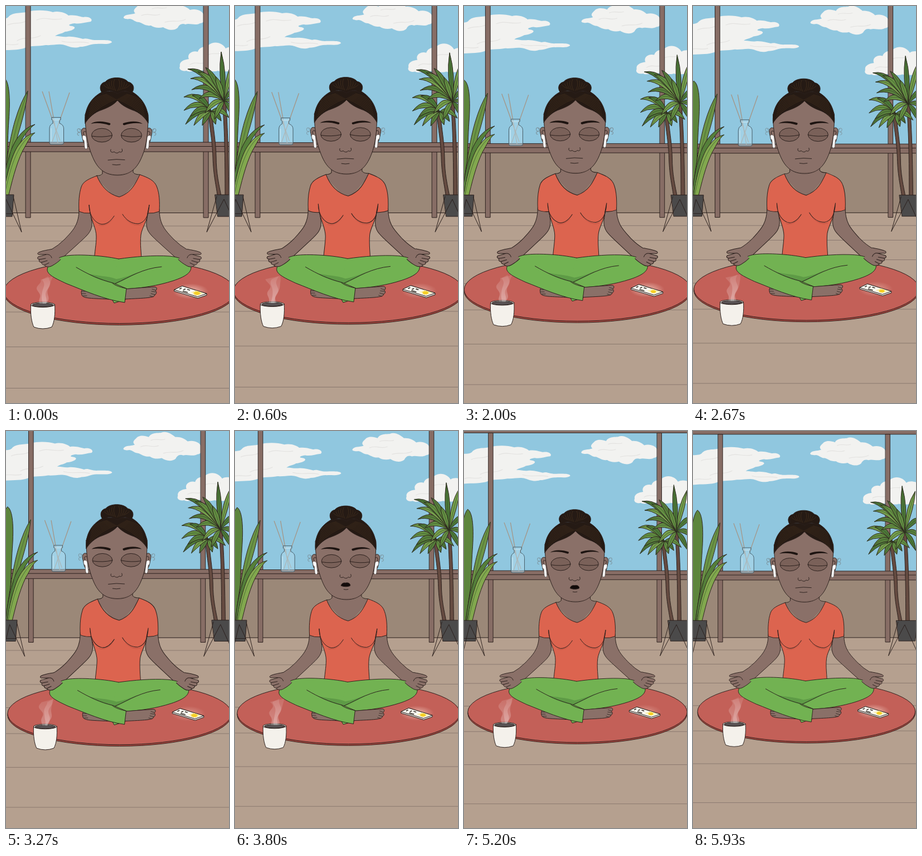
Write an HTML page that moves like this. It is 400 px wide and 711 px high and loops after 6 s.

```html
<!DOCTYPE html>
<html lang="en">
<head>
<meta charset="utf-8">
<title>Breathing break</title>
<style>
html, body { margin: 0; width: 100%; height: 100%; overflow: hidden; background: #b5a08f; }
svg { display: block; width: 400px; height: 711px; }
.o { stroke: #2a1f1c; stroke-width: 1; stroke-linejoin: round; stroke-linecap: round; }
.l { fill: none; }
.skin { fill: #8a7068; }
.shirt { fill: #dc644f; }
.pants { fill: #72b252; }
.wood { fill: #876d65; }
.pot { fill: #4b4a4a; }
.cloud { fill: #f2f2f0; }
.shade { fill: none; stroke: #e3e2e0; stroke-width: 1.2; stroke-linecap: round; }
</style>
</head>
<body>
<svg viewBox="0 0 400 711">
<defs>
  <linearGradient id="fade" x1="0" y1="0" x2="0" y2="1">
    <stop offset="0" stop-color="#fff" stop-opacity=".1"/>
    <stop offset="1" stop-color="#fff" stop-opacity=".26"/>
  </linearGradient>
  <radialGradient id="glow">
    <stop offset=".4" stop-color="#ffe9dc" stop-opacity=".4"/>
    <stop offset="1" stop-color="#ffe9dc" stop-opacity="0"/>
  </radialGradient>
</defs>
<g id="scene">
  <rect x="-20" y="-40" width="440" height="300" fill="#90c7df"/>

  <path class="cloud" d="M-25 24C-8 23 0 24 4 20C12 10 28 14 40 10C52 7 72 7 84 11C95 8 108 13 112 17C125 15 134 20 139 20C149 18 157 24 152 28C142 29 133 33 123 31C115 32 108 35 119 36C130 39 117 45 106 46C100 50 92 50 88 54C94 53 101 56 110 55C121 54 130 57 138 59C146 56 152 62 164 61C174 61 190 60 190 65C183 70 172 67 163 68C153 67 145 73 133 73C121 77 112 72 105 70C93 67 84 71 71 70C58 73 45 70 34 75C19 81 -6 77 -25 82Z"/>
  <path class="shade" d="M3 34C16 28 25 34 38 26M55 25C72 18 80 27 100 23M20 62C36 53 45 62 62 53M100 63C118 68 126 62 148 66M-10 70C2 66 10 72 22 68"/>
  <g transform="translate(0 2)">
    <path class="cloud" d="M211 18C214 12 224 14 232 11C226 6 232 2 237 -3C244 -7 252 -5 258 -3C263 -12 276 -10 281 -11C290 -15 300 -9 307 -3C316 -4 325 0 330 5C342 2 351 7 354 12C360 20 357 28 348 29C340 34 329 28 322 31C314 28 310 33 308 37C300 44 288 40 282 36C274 38 266 37 260 33C250 34 245 29 239 27C231 27 229 22 222 21C217 22 210 21 211 18Z"/>
    <path class="shade" d="M243 15C255 9 263 18 276 13M285 27C300 22 308 29 322 22M262 3C272 -1 280 4 288 1"/>
  </g>
  <path class="cloud" d="M312 108C310 100 319 96 328 95C324 87 333 79 344 82C348 71 359 74 363 70C375 61 389 67 394 76C403 70 414 76 425 78V120C405 113 395 120 380 116C369 120 356 112 348 117C337 114 330 120 324 116C315 118 309 113 312 108Z"/>
  <path class="shade" d="M330 105C340 98 348 106 358 101M362 88C370 82 378 88 390 84"/>

  <rect x="-20" y="261" width="440" height="111" fill="#9b8878"/>
  <rect x="-20" y="371" width="440" height="400" fill="#b5a08f"/>
  <path class="o l" stroke-width=".8" d="M-20 370.5H420"/>
  <g id="planks" stroke="#84736a" stroke-width=".9"></g>

  <g class="o wood">
    <rect x="-20" y="-40" width="440" height="23.700"/>
    <path d="M35.500 -16.300H44V379H35.500ZM354.500 -16.300H363V379H354.500Z"/>
    <rect x="-20" y="244" width="440" height="17"/>
    <path class="l" d="M-20 251.500H420"/>
  </g>

  <g fill="none" stroke="#a59484" stroke-width="1.300">
    <path d="M65 153L97 241M77 153L93 245M114 155L83 243"/>
  </g>
  <path fill="#b4dced" fill-opacity=".5" stroke="#435964" d="M82 199.500H98V204H96V210C101 212 103.500 215 103.500 220V245Q103.500 248 100 248H81Q78 248 78 245V220C78 215 80 212 84 210V204H82Z"/>
  <path fill="none" stroke="#cfe8f1" d="M81 219V243M83 204H97"/>

  <g id="palm"></g>
  <g id="aloe"></g>

  <ellipse class="o" cx="203.700" cy="513.800" rx="207.500" ry="57.500" fill="#a9473f"/>
  <ellipse class="o" cx="203.700" cy="511" rx="207.500" ry="57.500" fill="#c36058"/>

  <g class="torso">
    <path class="skin" d="M172 270V303L160 306L202 350L243 304L228 300V270Z"/>
    <path class="o l" d="M173 285V300Q171 304 163 304M228 285V298Q231 302 240 302"/>
    <g id="arm"><path class="o skin" d="M131 364C131 392 120 402 105 418Q94 429 80 437L97 455L128 427C145 411 155 405 154 387L151 366"/></g>
    <use href="#arm" transform="matrix(-1 0 0 1 406 0)"/>
    <path class="o shirt" d="M163 304C150 309 138 314 135 324C131 336 130 352 131 368Q140 372 151 371C154 386 162 399 162 413C162 428 159 438 158 460H243C243 440 240 428 242 410C244 396 254 384 254 371Q265 372 275 368C276 350 275 336 271 325C267 312 254 307 240 302C232 319 224 335 203 342C183 337 170 322 163 304Z"/>
    <path class="o l" d="M151 371L149 356C149 376 160 389 172 391C183 391 190 382 194 376M254 371L257 356C256 376 249 388 237 390C225 390 215 383 209 373"/>
    <path fill="none" stroke="#b84c3e" stroke-width="1.500" opacity=".5" d="M166 392C176 396 184 389 190 383M243 391C232 395 222 389 215 382"/>
  </g>

  <g class="o">
    <path class="skin" d="M201 505L138 507C134 510 135 514 136 518C140 525 158 523 198 526"/>
    <path class="l" d="M136 511H142M136 515H143M138 519H145" stroke-width=".8"/>
    <path class="pants" d="M202 453C230 449 265 446 293 448C316 450 330 459 332 468C332 478 321 485 300 492C272 501 245 505 214 507L214 526L194 532L188 522L160 480Z"/>
    <path class="skin" d="M212 507C235 505 252 504 266 503C272 503 271 508 268 510C271 512 270 516 267 517C267 523 250 523 213 525"/>
    <path class="l" d="M262 507L268 509M261 511L268 512M260 515L267 517M258 519L264 521" stroke-width=".8"/>
    <path class="pants" d="M202 453C170 446 122 444 104 448C88 452 74 462 74 473C75 482 91 489 108 497C139 509 176 526 213 531L216 506C201 503 194 499 190 496"/>
    <path fill="#5e9b46" stroke="none" d="M146 479C164 484 182 483 198 489C212 487 226 481 238 476C224 485 212 491 197 498C178 494 160 488 146 479Z"/>
    <path class="l" d="M126 468C148 481 168 490 192 496L216 506M279 467C245 470 223 485 196 497"/>
  </g>

  <g class="torso">
    <g id="hand">
      <path class="o skin" d="M82 435.500C75 437 66 438 59 441C55 443 57 446 61 445L72 445C66 447 61 448 58 449C55 451 57 454 60 454C58 457 61 460 64 459C63 463 68 464 69 464C71 468 78 468 83 465C90 461 94 458 98 454"/>
      <path class="o l" stroke-width=".8" d="M72 445C77 444 81 447 82 451M60 454L71 452M64 459L74 456M69 464L77 460"/>
    </g>
    <use href="#hand" transform="matrix(-1 0 0 1 407 0)"/>
  </g>

  <g id="head">
    <g id="ear">
      <path class="o skin" d="M146 221C138 215 133 221 136 231C138 241 139 250 147 249"/>
      <path class="o l" stroke-width=".8" d="M144 226C139 222 137 227 140 232"/>
      <path d="M137 235C136 230 144 231 144 236L146 253Q146 256 143.500 256Q141.500 256 141 253L140 241Q137 240 137 235Z" fill="#fafafa" stroke="#55504e" stroke-width=".7"/>
    </g>
    <use href="#ear" transform="matrix(-1 0 0 1 397 0)"/>
    <g class="ring" fill="none" stroke="#7b929c" stroke-width="1.100">
      <path d="M135 222C130 217 126 221 129 225C132 228 136 224 132 221M133 227C128 225 126 231 131 232"/>
      <path d="M262 222C267 217 271 221 268 225C265 228 261 224 265 221M264 227C269 225 271 231 266 232"/>
    </g>
    <path class="o skin" d="M142 195C142 226 147 250 154 267C161 285 172 303 200 303C227 303 238 285 245 267C252 250 255 226 255 195C250 160 148 160 142 195Z"/>
    <path fill="#735b53" opacity=".5" d="M170 293C180 303 217 305 230 292C222 300 214 302 200 302C186 302 178 299 170 293Z"/>
    <path class="o" fill="#251a14" d="M142 210C140 186 150 165 174 153H225C247 165 257 187 255 210C250 200 239 190 226 186C213 181 205 175 200 169C195 175 186 181 172 186C159 190 148 200 142 210Z"/>
    <path class="o" fill="#251a14" d="M174 157C166 150 168 138 178 136C186 126 211 126 219 136C230 138 232 150 224 157C216 149 208 153 200 157C190 151 181 150 174 157Z"/>
    <g id="half"></g>
    <use href="#half" transform="matrix(-1 0 0 1 397 0)"/>
    <g id="eye">
      <ellipse class="o" cx="172" cy="231.500" rx="18.500" ry="12.300" fill="#7a6159" stroke-width=".9"/>
      <path class="o l" d="M154 233Q172 236 190 232" stroke-width=".9"/>
      <path class="brow" fill="#1d1411" d="M152 211C160 205 176 206 187 210Q188 213 185 213.500C173 209.500 162 209 152 211Z"/>
    </g>
    <use href="#eye" transform="matrix(-1 0 0 1 397 0)"/>
    <path class="o l" d="M188 257C186 262 191 263 194 261C197 264 201 264 203 261C207 263 210 261 208 256"/>
    <path id="shut" class="o l" d="M183 276Q198 273.500 213 275.500M191 284Q198 285.500 205 284"/>
    <g id="open">
      <path class="o" fill="#120b0a" d="M190 277C190 273 195 271 198 272C202 271 207 272 207 277C204 279.500 193 279.500 190 277Z"/>
      <path class="o l" d="M195 284Q199 285 203 284"/>
    </g>
  </g>

  <ellipse id="halo" cx="331" cy="511" rx="32" ry="14" fill="url(#glow)"/>
  <path class="o" fill="#d8d4d0" d="M302 508L316 501.500L360 515V518L344 523.500L302 511Z"/>
  <path class="o" fill="#fbf8f0" stroke-width=".8" d="M302 508L316 501.500L360 515L344 520.500Z"/>
  <path stroke="#3c3632" stroke-width="1.700" d="M311 507L315 505M318 508.500L322 506.500M325 507.500L330 509M317 510.500L326 513"/>
  <path fill="#fdf1b4" d="M331 513L341 509.500L355 514.500L344 518Z"/>
  <path id="sun" fill="#f6ce25"/>

  <path class="o" fill="#f4f1eb" d="M44.500 535C43.500 552 46 567 50 575Q66 581 82 575C87 566 88.500 551 87.500 535Z"/>
  <ellipse class="o" cx="66" cy="535" rx="21.500" ry="4.500" fill="#dad5ce"/>
  <ellipse class="o" cx="66" cy="535.500" rx="19" ry="3.300" fill="#595354" stroke-width=".7"/>
  <path class="steam" fill="url(#fade)"/>
  <path class="steam" fill="url(#fade)"/>
</g>
</svg>
<script>
const LOOP = 6000, FPS = 15;
const $ = id => document.getElementById(id);
const all = sel => [...document.querySelectorAll(sel)];
const greens = ['#4d7838', '#659043', '#587f3c', '#759e4c'];

// A pointed leaf that arches and droops, with a midrib.
function leaf([x, y], [tx, ty], fill) {
  const lift = Math.abs(tx - x) * .45, w = 9;
  const cx = x + (tx - x) * .5, cy = y + (ty - y) * .5 - lift;
  const len = Math.hypot(tx - x, ty - y);
  const nx = -(ty - y) / len * w, ny = (tx - x) / len * w;
  return `<path class="o" stroke-width=".8" fill="${fill}" d="M${x} ${y}Q${cx + nx} ${cy + ny} ${tx} ${ty}Q${cx - nx} ${cy - ny} ${x} ${y}"/>
    <path fill="none" stroke="#344f28" stroke-width=".7" d="M${x} ${y}Q${cx} ${cy} ${tx} ${ty}"/>`;
}

const crown = (root, tips) => tips.map((tip, i) => leaf(root, tip, greens[i % 4])).join('');

$('planks').innerHTML = [394, 421, 457, 500, 548, 610.5, 684.5]
  .map(y => `<path d="M-20 ${y}H420"/>`).join('');

const stand = '<path class="o l" stroke-width="1.200" d="M13 341L28 405L0 346L-14 404M-14 372H12"/>';
const pot = '<path class="o pot" d="M-20 338H14L11 377H-20Z"/>' + stand;

$('palm').innerHTML = `
  <g class="o" fill="#654b41">
    <path d="M363 190C366 225 370 240 371 270C372 305 377 320 380 345H387C382 320 377 300 377 270C376 240 372 220 369 190Z"/>
    <path d="M388 170C392 215 393 270 393 345H400C399 270 398 220 394 170Z"/>
  </g>
  <path class="o pot" d="M375 338H415L411 377H380Z"/>
  <path class="o l" stroke-width="1.200" d="M378 341L360 405L391 346L418 405"/>`
  + crown([368, 188], [[386, 206], [376, 212], [352, 214], [337, 214], [322, 212],
    [319, 187], [330, 198], [319, 163], [334, 160], [400, 200]])
  + crown([391, 170], [[412, 205], [374, 203], [425, 185], [357, 192], [425, 145], [346, 166],
    [333, 150], [331, 130], [326, 113], [344, 118], [358, 110], [411, 92], [386, 82], [376, 126]]);

$('aloe').innerHTML = `
  <path class="o" fill="#5d853d" d="M-12 345C-22 240 -20 145 -4 128C6 134 8 165 5 205C2 250 2 310 -4 345Z"/>
  <path class="o" fill="#6c9446" d="M-8 342C0 285 6 240 16 206Q26 172 39 152C37 174 31 198 24 222C15 252 8 292 0 342Z"/>
  <path class="o" fill="#55803a" d="M-8 342C-2 290 6 258 20 237Q34 217 52 212C42 219 35 228 28 240C15 266 8 308 2 342Z"/>
  <path class="o" fill="#82a84e" d="M-6 342C4 290 12 262 24 247Q36 230 52 227C42 234 38 246 30 259C17 286 10 318 4 342Z"/>
  <path fill="none" stroke="#3f6030" stroke-width=".8" d="M-4 342C4 270 17 215 39 152M-3 342C8 285 22 242 52 227"/>` + pot;

const strands = (n, f) => Array.from({ length: n }, (_, k) => f(k)).join('');
$('half').innerHTML = `<path fill="none" stroke="#46321f" stroke-width=".9" opacity=".8" d="${
  strands(8, k => `M${198 - 2.4 * k} ${167 - 1.3 * k}Q${170 - k} ${176 - 2 * k} ${147 + .8 * k} ${200 - 4 * k}`)
}${strands(5, k => `M${197 - 3 * k} ${152 - k}Q${190 - 3 * k} ${141 + k} ${195 - 5 * k} ${131 + 2.6 * k}`)}"/>`;

const clamp = v => Math.min(1, Math.max(0, v));
const smooth = v => (v = clamp(v)) * v * (3 - 2 * v);

// Lungs: fill, hold, empty.
const breath = s => smooth(s / 1.2) - smooth((s - 3.3) / 1.5);

function plume(s, shift, size) {
  const left = [], right = [];
  for (let i = 0; i <= 16; i++) {
    const u = i / 16, y = 533 - 46 * u;
    const x = 66 + shift + 4 * u + (1 + 2.5 * u) * Math.sin(u * 8 - s * Math.PI * 2 + shift);
    const w = size * (6 + 6 * u + 1.5 * Math.sin(u * 12 - s * Math.PI * 2));
    left.push(`${x - w} ${y + 3 * u}`);
    right.unshift(`${x + w} ${y - 3 * u}`);
  }
  return `M${[...left, ...right].join('L')}Z`;
}

function sunPath(s) {
  const pulse = .5 + .5 * Math.cos(s * Math.PI * 2.5);
  const pts = Array.from({ length: 20 }, (_, i) => {
    const a = i * Math.PI / 10, r = i % 2 ? 4.3 : 5 + 2.5 * pulse;
    return `${342.5 + r * 1.05 * Math.cos(a)} ${514.5 + r * .6 * Math.sin(a)}`;
  });
  return `M${pts.join('L')}Z`;
}

const torso = all('.torso'), steam = all('.steam'), brow = all('.brow')[0], ring = all('.ring')[0];

function draw(s) {
  const zoom = 1 - .01 * s, b = breath(s), talk = s > 3.45 && s < 5.6;
  $('scene').setAttribute('transform', `translate(200 362) scale(${zoom}) translate(-200 -362)`);
  const k = 1 + .035 * b;
  torso.forEach(g => g.setAttribute('transform', `matrix(1 0 0 ${k} 0 ${448 * (1 - k)})`));
  $('head').setAttribute('transform', `translate(0 ${-4.6 * b})`);
  brow.setAttribute('transform', `translate(0 ${talk ? -1.5 : 0})`);
  $('open').style.display = talk ? '' : 'none';
  $('shut').style.display = talk ? 'none' : '';
  ring.setAttribute('opacity', .85 + .15 * Math.cos(s * Math.PI * 2));
  $('halo').setAttribute('opacity', .75 + .25 * Math.cos(s * Math.PI));
  $('sun').setAttribute('d', sunPath(s));
  steam[0].setAttribute('d', plume(s, 0, 1));
  steam[1].setAttribute('d', plume(s, 2, .5));
}

const start = performance.now();
function tick() {
  const ms = (performance.now() - start) % LOOP;
  draw(Math.floor(ms * FPS / 1000) / FPS);
  requestAnimationFrame(tick);
}
tick();
</script>
</body>
</html>
```
